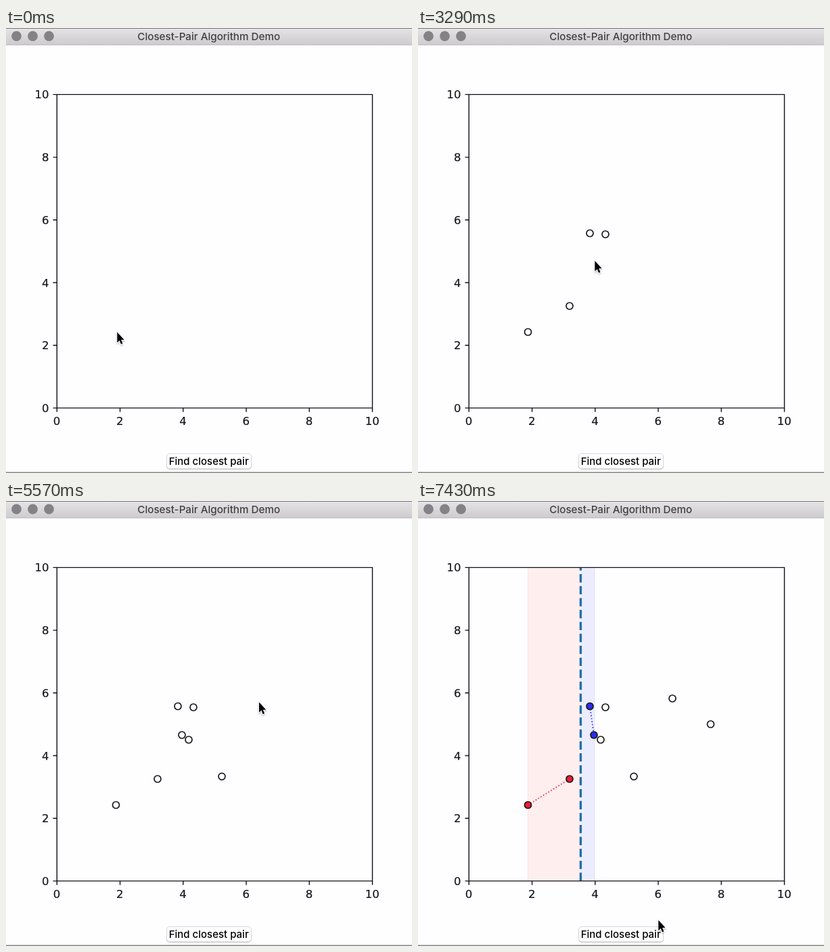
An HTML page that plays this animation: 600x658 px, repeating every 8 s.

```html
<!DOCTYPE html>
<html lang="en">
<head>
<meta charset="utf-8">
<title>Closest-Pair Algorithm Demo</title>
<style>
  html, body { margin: 0; width: 100%; height: 100%; overflow: hidden; background: #fefdff; }
  svg { display: block; }
  text { font-family: Inter, sans-serif; font-size: 15px; font-weight: 500; text-anchor: middle; }
  #axes text { font: 16.5px "DejaVu Sans", sans-serif; fill: #161616; stroke: #161616; stroke-width: .2; }
  #axes text.y { text-anchor: end; }
  #axes path { fill: none; stroke: #111; stroke-width: 1.4; }
  #dots circle { fill: #fff; stroke: #181818; stroke-width: 1.7; }
</style>
</head>
<body>
<svg width="600" height="658" viewBox="0 0 600 658">
  <defs>
    <linearGradient id="bar" x2="0" y2="1">
      <stop stop-color="#e6e4e6"/><stop offset="1" stop-color="#cdcbcd"/>
    </linearGradient>
    <filter id="shadow" x="-50%" y="-50%" width="200%" height="200%">
      <feDropShadow dx="0" dy="1.2" stdDeviation="1" flood-opacity=".35"/>
    </filter>
  </defs>
  <rect width="600" height="25" fill="url(#bar)"/>
  <path d="M0 .5H600" stroke="#777577"/>
  <path d="M0 25H600" stroke="#b8b6b8"/>
  <path d="M0 657.3H600" stroke="#858385" stroke-width="1.4"/>
  <path d="M15.5 12h.01m24 0h.01m24 0h.01" stroke="#848286" stroke-width="14.8" stroke-linecap="round"/>
  <text x="299.7" y="18" fill="#414041" style="font-size:15.2px">Closest-Pair Algorithm Demo</text>

  <g id="result"></g>
  <g id="axes"></g>
  <g id="dots"></g>

  <rect x="237" y="629.8" width="126" height="23" rx="5" fill="#bcbabc"/>
  <rect x="237.4" y="629.4" width="125.2" height="22.4" rx="4.6" fill="#fff" stroke="#d2d0d2" stroke-width=".8"/>
  <text x="299.7" y="646">Find closest pair</text>

  <path id="pointer" d="M.3 .8V16.2L3.7 13L6 18.6L8.4 17.6L6.1 12.1H10.6Z"
    stroke="#fff" stroke-width="1.6" paint-order="stroke" filter="url(#shadow)"/>
</svg>
<script>
const STEPS_PER_SECOND = 7, STEPS = 56, RESULT_STEP = 51;
const LEFT = 75.3, RIGHT = 541.5, TOP = 98.4, BOTTOM = 561.9, DIVIDER = 240.4;

// pointer stops: arrival step, x, y, and whether a point is placed there
const stops = [
  [0, 164, 449], [6, 162.5, 449.5, true], [10, 224, 411, true],
  [14, 253, 272], [15, 254, 303.5, true], [16, 259, 317],
  [20, 277, 305, true], [24, 260, 346, true], [28, 270, 353, true],
  [31, 262, 612], [34, 319, 407.3, true], [39, 376, 292, true],
  [42, 432.5, 330, true], [44, 433, 337], [50, 318, 632], [52, 355, 619]
];

const $ = id => document.getElementById(id);

function add(parent, tag, attrs, text = '') {
  const el = document.createElementNS('http://www.w3.org/2000/svg', tag);
  for (const name in attrs) el.setAttribute(name, attrs[name]);
  el.textContent = text;
  return $(parent).appendChild(el);
}

add('axes', 'path', { d: `M${LEFT} ${TOP}H${RIGHT}V${BOTTOM}H${LEFT}Z` });
for (let v = 0; v <= 10; v += 2) {
  const x = LEFT + (RIGHT - LEFT) * v / 10, y = BOTTOM + (TOP - BOTTOM) * v / 10;
  add('axes', 'path', { d: `M${x} ${BOTTOM}v5.8M${LEFT} ${y}h-5.8` });
  add('axes', 'text', { x: x - .3, y: 587 }, v);
  add('axes', 'text', { x: 63.5, y: y + 6, class: 'y' }, v);
}

const dots = stops.filter(stop => stop[3]).map(([start, x, y]) =>
  ({ start, x, y, el: add('dots', 'circle', { cx: x, cy: y, r: 5 }) }));

// the four leftmost points form a pair on each side of the divider
const sorted = [...dots].sort((a, b) => a.x - b.x);

function addPair([a, b], from, to, edge, colour, tint) {
  a.colour = b.colour = colour;
  add('result', 'rect', { x: from, y: TOP, width: to - from, height: BOTTOM - TOP, fill: tint });
  add('result', 'path', { d: `M${edge} ${TOP}V${BOTTOM}`, stroke: colour, 'stroke-opacity': .08 });
  add('result', 'path', {
    d: `M${a.x} ${a.y}L${b.x} ${b.y}`, stroke: colour, 'stroke-width': 1.7, 'stroke-dasharray': '1.67 2.75'
  });
}
addPair(sorted.slice(0, 2), sorted[0].x, DIVIDER, sorted[0].x, '#ee1c36', '#ffeeee');
addPair(sorted.slice(2, 4), DIVIDER, sorted[3].x + 1, sorted[3].x + 1, '#2c2cee', '#ececff');
add('result', 'path', {
  d: `M${DIVIDER} ${BOTTOM}V${TOP}`, stroke: '#2070aa', 'stroke-width': 3.33, 'stroke-dasharray': '12.33 5.33'
});

// ease out from each stop to the next
function pointerAt(step) {
  const next = stops.findIndex(stop => stop[0] > step);
  if (next < 0) return stops.at(-1).slice(1, 3);
  const [s0, x0, y0] = stops[next - 1], [s1, x1, y1] = stops[next];
  const k = 1 - ((s1 - step) / (s1 - s0)) ** 2;
  return [x0 + (x1 - x0) * k, y0 + (y1 - y0) * k];
}

function draw() {
  const step = Math.floor(performance.now() / 1000 * STEPS_PER_SECOND) % STEPS;
  const solved = step >= RESULT_STEP;
  $('result').style.display = solved ? '' : 'none';
  for (const { start, colour, el } of dots) {
    el.style.display = step >= start ? '' : 'none';
    el.style.fill = solved && colour || '';
  }
  $('pointer').setAttribute('transform', `translate(${pointerAt(step)})`);
  requestAnimationFrame(draw);
}
draw();
</script>
</body>
</html>
```
